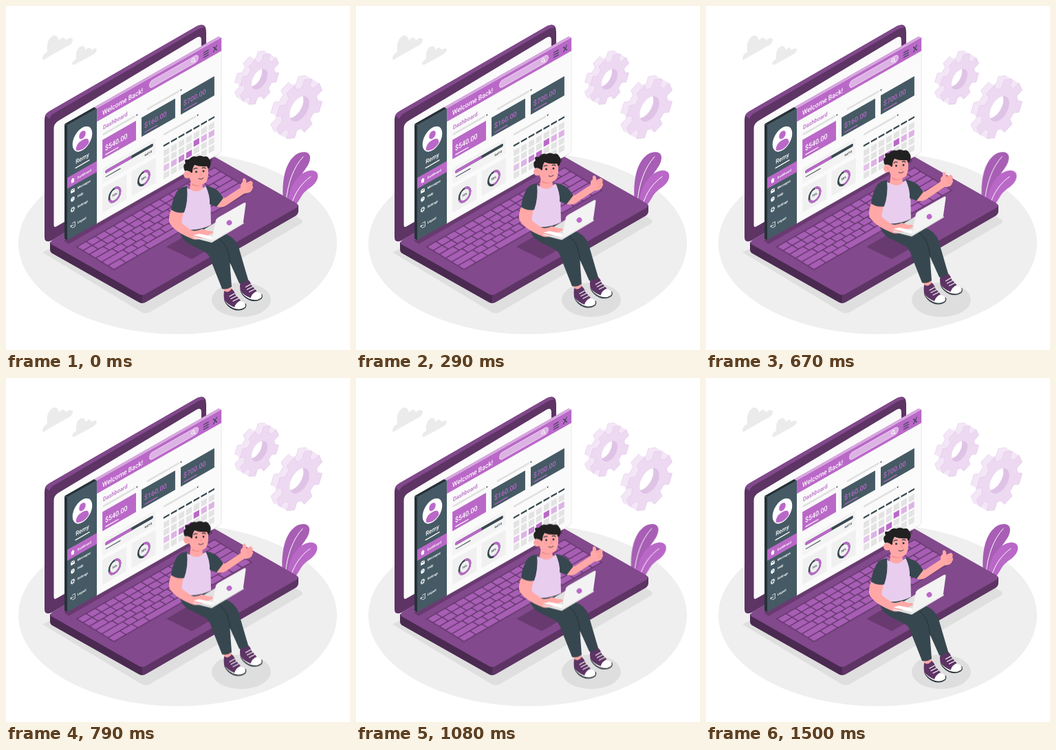
Recreate the animation shown at these times as an HTML page. Size 500 by 500 pixels, loop 1.54 s.

```html
<!DOCTYPE html>
<html lang="en">
<head>
<meta charset="utf-8">
<title>Dashboard illustration</title>
<style>
  html, body { margin: 0; width: 100%; height: 100%; overflow: hidden; background: #fff; }
  svg { display: block; width: 100vw; height: 100vh; }
  text { font-family: Roboto, "Open Sans", sans-serif; font-weight: 500; }
  .line { fill: none; stroke-linecap: round; stroke-linejoin: round; }
  .menu { font-size: 4.8px; font-weight: 600; fill: #fff; }
  .price { font-size: 10.2px; }
  .tiny { font-size: 4.6px; font-weight: 700; fill: #37474f; }
  .skin { fill: #ffa8a7; }
  .dark { fill: #37474f; }
</style>
</head>
<body>
<svg viewBox="0 0 500 500">
  <defs>
    <g id="shoe">
      <path class="skin" d="M315.500 408L327 405L329 417L319 420Z"/>
      <path fill="#263238" d="M317 428Q321 437 330 441Q340 445 348 439Q350 436 349 433L340 430Z"/>
      <path fill="#fff" d="M317 426Q320 434 330 439Q340 443 347 438Q350 434 345 430L330 427Z"/>
      <path fill="#5d3464" d="M317 414Q323 418 328 411Q332 414 333 419L341 428Q334 431 332 438Q322 434 317 427Q316 420 317 414Z"/>
      <path class="line" stroke="#fff" stroke-width="1.200" d="M325 422L332 418M327 425.500L335 421.500M330 429L338 425"/>
    </g>
  </defs>

  <ellipse cx="249.500" cy="345" rx="231.500" ry="132" fill="#efefef"/>
  <path fill="#dfdfdf" d="M53 358L197 445Q203 448 209 445L429 316Q433 313 429 310L300 240Z"/>

  <g fill="#ebebeb">
    <path d="M53 77Q53 70 60 67Q58 50 67 44Q74 40 77 50Q84 42 87 50Q93 44 97 48Q98 55 88 59L60 75Q54 80 53 77Z"/>
    <path d="M96 84Q97 79 102 77Q101 63 108 59Q114 56 116 64Q122 57 124 64Q130 60 132 63Q132 68 124 72L102 84Q97 87 96 84Z"/>
  </g>

  <g id="gears"></g>

  <g id="plant">
    <path fill="#a75eb4" d="M403 290C400 252 406 226 423 215C432 210 442 212 442 220C442 233 430 240 424 256C420 268 419 280 412 294Z"/>
    <path fill="#ba68c8" d="M408 296C410 267 422 245 438 240C448 237 455 241 453 250C450 262 437 265 431 274C426 282 421 292 412 297Z"/>
    <path class="line" stroke="#fff" stroke-width="1" d="M407 286C409 258 418 234 432 219M415 288C420 271 430 257 443 248"/>
  </g>

  <!-- laptop base -->
  <path fill="#4a2a50" d="M64 343V354Q64 358 68 360L192 430Q195 432 198 432V410Z"/>
  <path fill="#5d3464" d="M198 410V432Q201 432 204 430L421 305Q425 302 425 298V289Z"/>
  <path fill="#82498c" d="M71 338Q60 344 69 348L192 418Q198 422 204 418L421 294Q428 290 421 286L303 219L240 240Z"/>
  <path fill="#693a70" d="M84 341L91 346L300 226L300 215Z"/>
  <path fill="#693a70" d="M233 350L271 328L308 346L270 368Z"/>
  <g id="keys" transform="matrix(1 -.575 1 .61 103 350)"></g>

  <!-- laptop screen -->
  <path fill="#5d3464" d="M56 336L56 165Q56 157 63 153L278 29Q291 23 291 38L291 210L66 341Q56 345 56 336Z"/>
  <path fill="#82498c" d="M57 159Q59 155 63 153L278 29Q285 26 289 31Q284 31 279 34L68 157Q64 160 63 164Z"/>
  <path fill="#fafafa" d="M69.500 318L69.500 178Q69.500 171 76 167L277 46Q284 42 284 50L284 200L74 320Q69.500 323 69.500 318Z"/>

  <!-- app window -->
  <path fill="#263238" d="M85 172L89 173.300V340.500L85 338Z"/>
  <path fill="#d6a4de" d="M128 147L309 44L313 46.300L132 149.300Z"/>
  <path fill="#263238" d="M85 171.500L128 147L132 149.300L89 173.500Z"/>
  <g transform="matrix(.866 -.493 0 1 89 173.300)">
    <path fill="#fafafa" stroke="#e0e0e0" stroke-width=".7" d="M49 0H258.700V163Q258.700 167 254 167H49Z"/>
    <rect width="49.700" height="167" fill="#455a64"/>
    <rect x="49.700" width="209" height="19.500" fill="#ba68c8"/>
    <text x="59" y="15" font-size="9.900" fill="#fff">Welcome Back!</text>
    <rect x="138" y="5" width="82" height="10" rx="5" fill="#dcb3e4" stroke="#ecd5f0" stroke-width=".9"/>
    <g class="line" stroke="#fff" stroke-width="1"><circle cx="211" cy="9.500" r="2.300"/><path d="M213 11.500L215 13.500"/></g>
    <path class="line" stroke="#37474f" stroke-width="1.400" d="M229 7.500H237M229 11H237M229 14.500H237M245.500 7.500L251 14.500M251 7.500L245.500 14.500"/>

    <circle cx="25.400" cy="32.500" r="16.500" fill="#fff"/>
    <circle cx="25.400" cy="26.500" r="5.500" fill="#ba68c8"/>
    <path fill="#ba68c8" d="M14.500 43Q14.500 34 25.400 34Q36.300 34 36.300 43Q32 47.500 25.400 47.500Q19 47.500 14.500 43Z"/>
    <text x="25.400" y="63.500" font-size="9" fill="#fff" text-anchor="middle">Remy</text>
    <path class="line" stroke="#fff" stroke-width="1.500" d="M14 69H37"/>
    <rect y="76.500" width="49.700" height="16" fill="#ba68c8"/>
    <g id="menu"></g>
    <path fill="#fff" d="M6 84.500L9.200 81L12.500 84.500H11.500V88H7V84.500Z"/>
    <path fill="#fff" d="M6 97H12.500V102.500H6Z"/>
    <path class="line" stroke="#455a64" stroke-width=".8" d="M6 97L9.200 100L12.500 97"/>
    <circle cx="9.200" cy="112" r="3.200" fill="#fff"/>
    <text x="9.200" y="113.800" font-size="5" fill="#455a64" text-anchor="middle">?</text>
    <circle cx="9.200" cy="127" r="2.200" fill="none" stroke="#fff" stroke-width="1.300"/>
    <circle cx="9.200" cy="127" r="3.300" fill="none" stroke="#fff" stroke-width="1" stroke-dasharray="1.300 1.290"/>
    <path class="line" stroke="#fff" stroke-width=".9" d="M9 147V146.500H13V153.500H9V153M5.500 150H10.500M7 148.500L5.500 150L7 151.500"/>

    <text x="60" y="36" font-size="8.500" fill="#ba68c8">Dashboard</text>
    <g id="drops"></g>
    <g id="cards"></g>

    <rect x="59" y="92" width="89" height="22" fill="#f3f3f3"/>
    <path class="line" stroke="#37474f" stroke-width="4.500" d="M66 99.500H142"/>
    <path class="line" stroke="#ba68c8" stroke-width="4.500" d="M66 99.500H106"/>
    <path class="line" stroke="#37474f" stroke-width="1.200" d="M65 107H89"/>
    <text class="tiny" x="130" y="109.500">6of10</text>
    <g id="donuts"></g>
    <g id="days"></g>
  </g>

  <ellipse cx="342" cy="427" rx="43" ry="25" fill="#dedede"/>

  <g id="person">
    <use href="#shoe" transform="translate(23.500 -13.500)"/>
    <use href="#shoe"/>
    <path class="dark" d="M285 325L318 331Q333 336 338 350L352 398Q347 404 339 403L322 365L290 345Z"/>
    <path class="dark" d="M252 324Q253 338 266 346L288 357Q296 361 299 373L314 411Q321 413 328 408L325 368Q323 350 308 341L298 320Z"/>
    <path class="line" stroke="#263238" stroke-width="1" d="M305 335Q321 344 324 363L326 374"/>

    <!-- raised arm -->
    <path class="skin" d="M298 275L313 277L318 279L341 264L347 272L320 290Q311 296 299 288Z"/>
    <path class="skin" d="M341 264Q340 258 344 256L344 252Q345 249 348 251Q350 255 349 257L356 254Q360 256 358 260Q360 264 358 266Q357 271 350 272Q345 273 342 270Z"/>
    <path class="line" stroke="#f28f8f" stroke-width=".8" d="M350 259L357 257.500M351 263L358 261.500M351 267L357 265.500"/>

    <path fill="#e8cdee" d="M261 264Q276 271 291 262L297 273L298 318Q280 328 256 324L254 302L254 276Z"/>
    <path class="dark" d="M290 261Q305 264 310 271L316 279L306 292L296 288Q297 276 290 261Z"/>
    <path class="skin" d="M269 252L267 266Q277 273 286 266L285 255Z"/>
    <path fill="#f28f8f" d="M270 260Q277 264 285 260L285 257L272 256Z"/>
    <path class="skin" d="M266 233L293 229Q296 248 291 256Q284 262 275 260Q267 256 266 247Z"/>
    <ellipse class="skin" cx="263.500" cy="245" rx="5.500" ry="5.500"/>
    <path class="line" stroke="#f28f8f" stroke-width=".8" d="M261 244Q264 242 265 247M283 241L285 246L282.500 246.500"/>
    <path fill="#212121" d="M268 241Q263 238 260 240Q256 232 261 228Q259 225 261 223Q265 224 267 222Q271 217 277 219Q282 216 287 219Q293 217 295 222Q299 226 297 232Q296 236 294 237L292 233Q282 234 274 231Q271 235 271 241Q270 244 268 241Z"/>
    <g fill="#263238"><circle cx="276.500" cy="241" r="1.500"/><circle cx="287" cy="240" r="1.500"/></g>
    <path class="line" stroke="#263238" stroke-width="1.100" d="M273 237Q275 235 278 236M285 235.500Q288 234 290 236"/>
    <path class="line" stroke="#263238" stroke-width=".9" d="M280 251Q284 253 287 250"/>

    <!-- small laptop and resting arm -->
    <path fill="#e0e0e0" d="M272 334L309 312L345 314L299 343Z"/>
    <path class="skin" d="M240 296Q235 309 238 316Q246 329 272 339Q282 341 289 335L301 330Q301 326 294 327L285 324Q276 328 270 326Q259 319 255 315L258 299Z"/>
    <path class="dark" d="M263 262Q251 263 247 272Q241 284 240 296Q249 302 259 300Q265 284 263 262Z"/>
    <path fill="#e0e0e0" d="M272 335L299 341L345 314L346 316L299 344L272 337Z"/>
    <path fill="#f3f3f3" d="M305 311Q306 309 309 307L346 286Q349 285 348.500 288L345 313Q345 315 342 317L299 342Z"/>
    <path fill="#fff" d="M272 333L299 340L300 335L281 331Z"/>
    <ellipse cx="324.500" cy="315" rx="4" ry="3.700" transform="rotate(-35 324.500 315)" fill="#ba68c8"/>
  </g>
</svg>

<script>
const $ = id => document.getElementById(id);
const fill = (id, html) => { $(id).innerHTML = html; };
const range = n => [...Array(n).keys()];

// Gears: extruded copies of one toothed outline in the isometric plane
function gearPath(r) {
  const at = (rad, a) => `${(rad * Math.cos(a)).toFixed(2)} ${(rad * Math.sin(a)).toFixed(2)}`;
  return 'M' + range(8).map(i => {
    const a = (i + .5) * Math.PI / 4;
    return [at(r * .76, a - .24), at(r, a - .18), at(r, a + .18), at(r * .76, a + .24)].join('L');
  }).join('L') + 'Z';
}
function gear(x, y, r, hole, depth, id) {
  const d = gearPath(r);
  const plane = (dx, body) => `<g transform="matrix(.866 -.5 0 1 ${x - dx} ${y - dx * .57})">${body}</g>`;
  const sides = range(17).map(i => plane(depth * (1 - i / 16),
    `<path d="${d}" fill="#f3e6f6" ${i ? '' : 'stroke="#e3c9e9" stroke-width=".7"'}/>`)).join('');
  const face = plane(0, `<path d="${d}" fill="#eed9f2" stroke="#e3c9e9" stroke-width=".7"/>
    <circle r="${hole}" fill="#dfc3e6"/>
    <clipPath id="${id}"><circle r="${hole}"/></clipPath>
    <g clip-path="url(#${id})"><circle cx="${-depth / .866}" cy="${-depth * 1.15}" r="${hole}" fill="#fff"/></g>`);
  return sides + face;
}
fill('gears', gear(368.5, 106.5, 33, 13.5, 8, 'h1') + gear(426.5, 149.5, 39, 16.5, 8.5, 'h2'));

// Keyboard: relative key widths per row
const rows = [
  Array(15).fill(1),
  [...Array(13).fill(1), 2],
  [1.5, ...Array(12).fill(1), 1.5],
  [1.8, ...Array(11).fill(1), 2.2],
  [2.3, ...Array(10).fill(1), 2.7],
  [1.3, 1.3, 1.3, 5.5, 1.3, 1.3, 1, 1, 1]
];
const boardW = 200, rowH = 9;
fill('keys', `<rect x="-1" y="-1" width="${boardW + 2}" height="${rows.length * rowH + 2}" fill="#6d3d76"/>` +
  rows.map((row, j) => {
    const unit = boardW / row.reduce((a, b) => a + b);
    let x = 0;
    return row.map(w => {
      const key = `<rect x="${x + .8}" y="${j * rowH + .8}" width="${w * unit - 1.6}" height="${rowH - 1.6}" rx="1" fill="#a75eb4"/>`;
      x += w * unit;
      return key;
    }).join('');
  }).join(''));

fill('menu', [['Dashboard', 86.5], ['Messages', 101.5], ['Help', 113.5], ['Settings', 128.8], ['Logout', 151.7]]
  .map(([s, y]) => `<text class="menu" x="17" y="${y}">${s}</text>`).join(''));

fill('drops', [[60, 43], [134, 43], [162, 93.5]].map(([x, y]) =>
  `<path class="line" stroke="#e0e0e0" stroke-width="3" d="M${x + 1} ${y}h52"/>
   <path fill="#37474f" d="M${x + 55.5} ${y - 1}h3l-1.500 2.500Z"/>`).join(''));

fill('cards', [[59, '$540.00', '#ba68c8', '#fff'], [124.7, '$160.00', '#455a64', '#ba68c8'], [190.5, '$700.00', '#455a64', '#ba68c8']]
  .map(([x, s, bg, ink]) => `<rect x="${x}" y="50.500" width="56.500" height="28" fill="${bg}"/>
    <text class="price" x="${x + 4.5}" y="68.500" fill="${ink}">${s}</text>
    <path stroke="${ink}" stroke-width="1.400" d="M${x + 5} 74.500h22"/>`).join(''));

fill('donuts', [[79.7, 70], [128.5, 50]].map(([x, pct]) =>
  `<rect x="${x - 20.5}" y="120.500" width="40.500" height="36" fill="#f0f0f0"/>
   <g transform="translate(${x} 140.300)" fill="none" stroke-width="3">
     <circle r="9.300" stroke="#37474f"/>
     <circle r="9.300" stroke="#ba68c8" pathLength="100" stroke-dasharray="${pct} 100" transform="rotate(-90)"/>
   </g>
   <text class="tiny" x="${x}" y="142" text-anchor="middle">${pct}%</text>`).join(''));

// Calendar: picked days as row-column
const picked = { '1-4': '#ba68c8', '1-5': '#dcb3e4', '1-6': '#dcb3e4', '2-0': '#e3c3e9', '2-1': '#dcb3e4', '2-2': '#c886d3', '2-3': '#ba68c8' };
fill('days', range(7).map(c => {
  const x = 166.5 + 12.6 * c;
  return `<rect x="${x - 5}" y="108.500" width="10" height="2.600" fill="#37474f"/>` + range(4).map(r =>
    `<rect x="${x - 4.7}" y="${116.5 + 11 * r}" width="9.400" height="8.600" fill="${picked[r + '-' + c] || '#e3e3e3'}"/>`).join('');
}).join(''));

// Motion: a 1.5 s cycle shown at 24 steps per second, looping after 1.54 s
const LOOP = 1540, CYCLE = 1500, STEP = 1000 / 24;
const float = [0, -10, 0].map(y => ({ transform: `translate(0px, ${y}px)` }));
const shake = [0, -1, 2, -4, 4, -4, 4, -4, 2, -1, 0].map(x => ({
  transform: `translate(${x}px, 0px)`, easing: 'cubic-bezier(.36,.07,.19,.97)'
}));
const moves = [['person', float], ['plant', shake]].map(([id, keys]) => {
  const move = $(id).animate(keys, { duration: CYCLE, fill: 'both' });
  move.pause();
  return move;
});
function draw() {
  const step = Math.floor((performance.now() % LOOP + 4.9) / STEP);
  for (const move of moves) move.currentTime = Math.min(step, 36) * STEP;
  requestAnimationFrame(draw);
}
draw();
</script>
</body>
</html>
```
